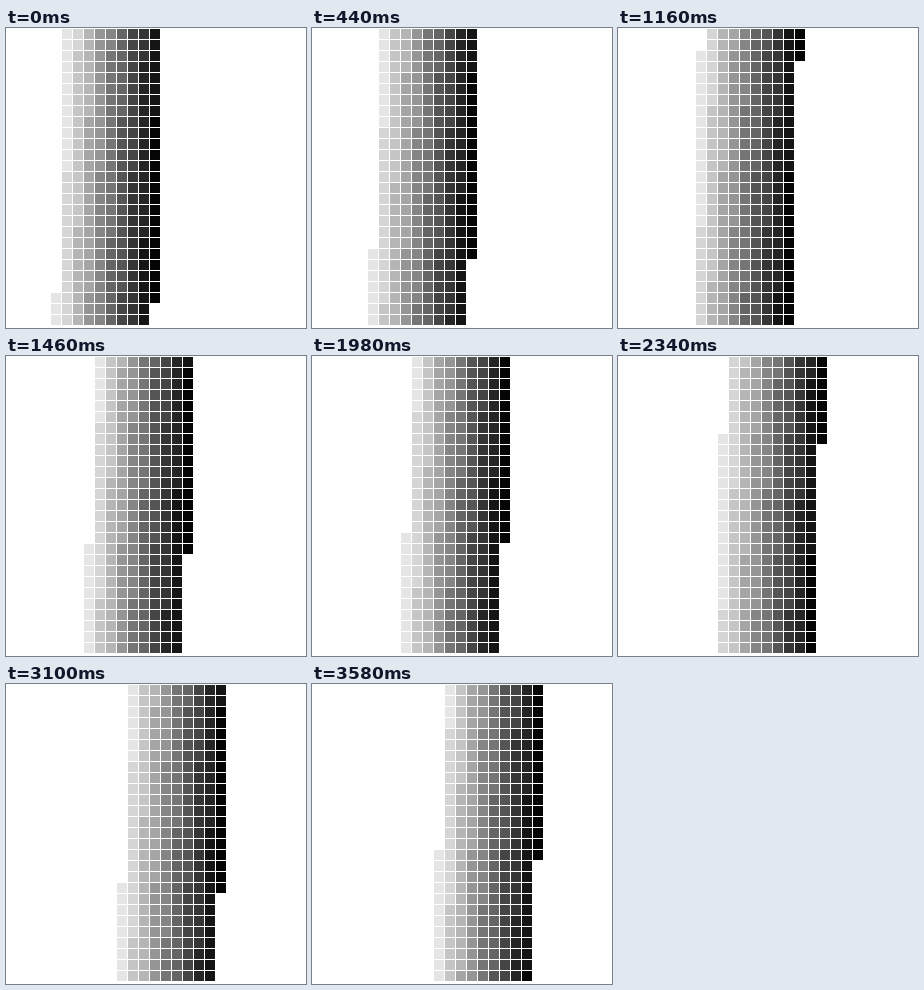
An HTML page with a canvas for the animation above (3.6 s loop, 300 by 300 pixels).

```html
<!DOCTYPE html>
<html lang="en">
<head>
<meta charset="utf-8">
<title>Grey trail</title>
<style>
  html, body { margin: 0; width: 100%; height: 100%; overflow: hidden; background: #fff; }
  canvas { display: block; }
</style>
</head>
<body>
<canvas id="stage" width="300" height="300"></canvas>
<script>
const ctx = document.getElementById('stage').getContext('2d');
const LOOP = 3600, STEP = 20;
const ROWS = 27, PITCH = 11, CELL = 10;
const LENGTH = 244, BANDS = 15, START = 375;

// The trail fades from black at its head to pale grey in even bands.
function shade(age) {
  const v = 5 + 16 * Math.floor(age * BANDS / LENGTH);
  return `rgb(${v},${v},${v})`;
}

function draw(time) {
  const step = Math.floor((time % LOOP) / STEP);
  // The first step advances two cells, every other step one.
  const head = START + (step ? step + 1 : 0);
  ctx.fillStyle = '#fff';
  ctx.fillRect(0, 0, 300, 300);
  for (let age = 0; age < LENGTH; age++) {
    const i = head - age;
    ctx.fillStyle = shade(age);
    ctx.fillRect(1 + PITCH * Math.floor(i / ROWS), 1 + PITCH * (i % ROWS), CELL, CELL);
  }
}

const start = performance.now();
function tick() {
  draw(performance.now() - start);
  requestAnimationFrame(tick);
}
tick();
</script>
</body>
</html>
```
